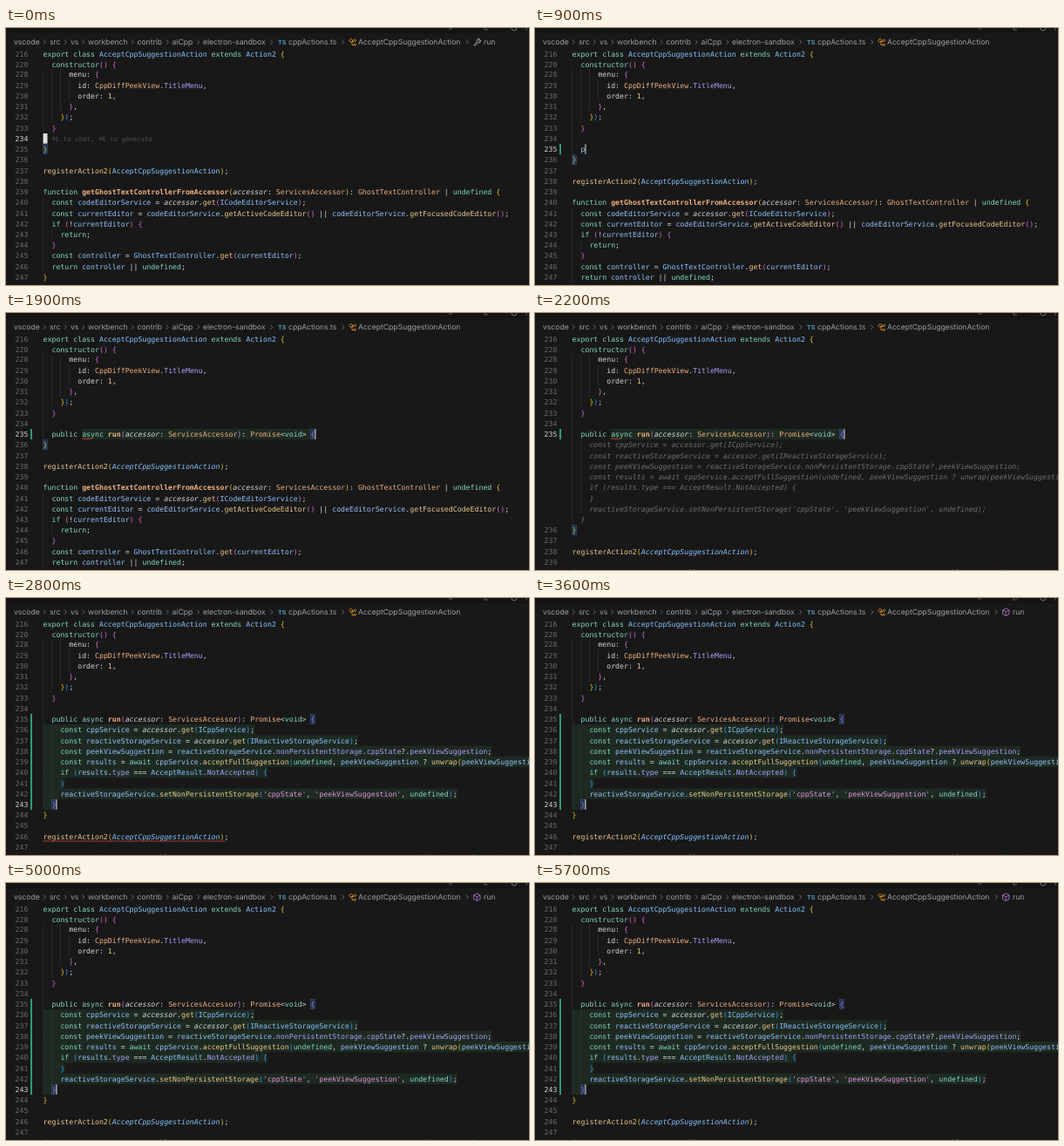
Recreate the animation shown at these times as an HTML page. Size 600 by 295 pixels, loop 5.8 s.

```html
<!DOCTYPE html>
<html lang="en">
<head>
<meta charset="utf-8">
<style>
  html, body { margin: 0; width: 100%; height: 100%; overflow: hidden; background: #181818; }
  svg { display: block; }
  text { white-space: pre; text-rendering: geometricPrecision; fill: #d6d6dd; }
  .code { font: 8.22px "DejaVu Sans Mono", monospace; }
  .crumb { font: 8.6px Inter, sans-serif; fill: #a0a0a0; }
  .ghost { font-style: italic; fill: #6f6f6f; }
  .num { fill: #6a6a6a; }
  .on { fill: #d0d0d0; }
  .hint { font-size: 7.4px; fill: #505050; }
  .detail { font-size: 7.06px; fill: #a3a7ad; }
</style>
</head>
<body>
<svg id="stage" width="600" height="295" viewBox="0 0 600 295"></svg>
<script>
const LOOP = 5800;
const LEFT = 42.6, CHAR = 4.949, ROW = 12.24;
const NEW_ROW = 9;

const HEAD = [
  'export class AcceptCppSuggestionAction extends Action2 {',
  '  constructor() {',
  '      menu: {',
  '        id: CppDiffPeekView.TitleMenu,',
  '        order: 1,',
  '      },',
  '    });',
  '  }',
  ''
];
const SIGNATURE = '  public async run(accessor: ServicesAccessor): Promise<void> {';
const BODY = [
  '    const cppService = accessor.get(ICppService);',
  '    const reactiveStorageService = accessor.get(IReactiveStorageService);',
  '    const peekViewSuggestion = reactiveStorageService.nonPersistentStorage.cppState?.peekViewSuggestion;',
  '    const results = await cppService.acceptFullSuggestion(undefined, peekViewSuggestion ? unwrap(peekViewSuggestion) : undefined);',
  '    if (results.type === AcceptResult.NotAccepted) {',
  '    }',
  "    reactiveStorageService.setNonPersistentStorage('cppState', 'peekViewSuggestion', undefined);",
  '  }'
];
const TAIL = [
  '}',
  '',
  'registerAction2(AcceptCppSuggestionAction);',
  '',
  'function getGhostTextControllerFromAccessor(accessor: ServicesAccessor): GhostTextController | undefined {',
  '  const codeEditorService = accessor.get(ICodeEditorService);',
  '  const currentEditor = codeEditorService.getActiveCodeEditor() || codeEditorService.getFocusedCodeEditor();',
  '  if (!currentEditor) {',
  '    return;',
  '  }',
  '  const controller = GhostTextController.get(currentEditor);',
  '  return controller || undefined;',
  '}'
];

const KEYWORDS = new Set(('export class extends constructor function const if return ' +
  'undefined public async await void').split(' '));
const BRACKETS = ['#e8c52c', '#d070cc', '#2f9bf0'];
const COLOR = {
  keyword: '#83d6c5', plain: '#d6d6dd', type: '#efb080', klass: '#87c3ff',
  call: '#ebc88d', prop: '#aaa0fa', string: '#e394dc', variable: '#94c1fa'
};

const colX = col => LEFT + col * CHAR;
const rowY = row => 28.9 + row * ROW + (row < 2 ? 1 : 0);
const escape = s => s.replace(/&/g, '&amp;').replace(/</g, '&lt;');
const rect = (x, y, w, h, fill, more = '') =>
  `<rect x="${x}" y="${y}" width="${w}" height="${h}" fill="${fill}" ${more}/>`;
const text = (x, y, cls, content, more = '') =>
  `<text x="${x}" y="${y}" class="${cls}" ${more}>${content}</text>`;
const path = (d, stroke, width = 0.8) =>
  `<path d="${d}" fill="none" stroke="${stroke}" stroke-width="${width}"/>`;

// Colours one line; depth selects the bracket colour and carries over to the next line.
function highlight(line, depth, italicClass) {
  const tokens = /'[^']*'|\w+|[{}()]|[^\w{}()']+/g;
  let out = '';
  for (const m of line.matchAll(tokens)) {
    const word = m[0], before = line.slice(0, m.index), after = line[m.index + word.length];
    let fill = COLOR.plain, style = '';
    if ('({'.includes(word)) fill = BRACKETS[depth++ % 3];
    else if (')}'.includes(word)) fill = BRACKETS[--depth % 3];
    else if (word[0] === "'") fill = COLOR.string;
    else if (KEYWORDS.has(word)) fill = COLOR.keyword;
    else if (/^\d/.test(word)) fill = COLOR.call;
    else if (word === 'accessor') style = 'font-style="italic"';
    else if (/^\w/.test(word)) {
      if (/(function|async) $/.test(before)) { fill = COLOR.type; style = 'font-weight="bold"'; }
      else if (after === '(') fill = COLOR.call;
      else if (before.endsWith('.')) fill = COLOR.prop;
      else if (/^[A-Z]/.test(word)) {
        fill = before.endsWith(': ') ? COLOR.type : COLOR.klass;
        if (italicClass && before.endsWith('registerAction2(')) style = 'font-style="italic"';
      }
      else if (after !== ':') fill = COLOR.variable;
    }
    out += `<tspan fill="${fill}" ${style}>${escape(word)}</tspan>`;
  }
  return { out, depth };
}

function squiggle(x, end, y) {
  let d = `M${x} ${y}`;
  for (let up = true; x < end; up = !up) d += `L${x += 1.4} ${y + (up ? -1.3 : 0)}`;
  return path(d, '#e0504a', 0.8);
}

function breadcrumbs(showRun, wrench) {
  const items = [['vscode', 9], ['src', 50], ['vs', 74], ['workbench', 94], ['contrib', 150.5],
    ['aiCpp', 190.5], ['electron-sandbox', 226], ['cppActions.ts', 324], ['AcceptCppSuggestionAction', 404]];
  if (showRun) items.push(['run', 548]);
  let out = items.map(([label, x]) => text(x, 19.3, 'crumb', label)).join('');
  const gaps = [44, 68, 88.5, 145, 185, 220.5, 304.5, 386.5];
  if (showRun) gaps.push(529);
  out += gaps.map(x => path(`M${x - 1} 13.7l2.3 2.5l-2.3 2.5`, '#7c7c7c', 0.8)).join('');
  out += text(312, 18.8, 'crumb', 'TS', 'style="fill:#519aba;font-size:7px;font-weight:700"');
  out += path('M393.5 14.5l2.5-2.3l2 2l-2.5 2.3zM396 15.5h3M397 15.5v4h2M399 14l1.5-1l1.3 1.3l-1.5 1.4zM399 19l1.5-1l1.3 1.3l-1.5 1.4z', '#ee9d28');
  if (!showRun) return out;
  return out + (wrench
    ? path('M537 19.5l3.4-3.8a2.4 2.4 0 0 1 3-3.2l-1.4 1.7l1.2 1.2l1.6-1.3a2.4 2.4 0 0 1-3.2 2.7l-3.4 3.7z', '#c5c5c5')
    : path('M536.5 14l4-2l3.5 2v4.3l-3.7 2.2l-3.8-2.2zM536.5 14l3.8 2l3.7-2M540.3 16v4.5', '#b180d7'));
}

const topStrip = () => rect(0, 0, 600, 6, '#141414') +
  path('M508 1h4M549 0v2h4M597 0v3', '#707070') + path('M580 0a3 3 0 0 0 6 0', '#8a8a8a');

function popup() {
  const x = 77.5, y = 145.5;
  return rect(x, y, 294.5, 25, '#1f1f1f', 'stroke="#3c3c3c" stroke-width=".7"') +
    rect(x + 0.5, y + 0.5, 293.5, 12.2, '#062f55') +
    path('M81 149.5h4M86.5 149.5h3M81 152.3h2M84.5 152.3h5M81 155h5M87.5 155h2', '#d0d0d0', 1) +
    path('M81.5 160.3h7.5v7.5h-7.5z', '#c5c5c5', 0.9) +
    text(93, 155, 'code', '<tspan font-weight="bold" fill="#73b8f0">publi</tspan>c') +
    text(93, 167.2, 'code', '<tspan font-weight="bold" fill="#73b8f0">publi</tspan>c method') +
    text(365.5, 154.8, 'code detail', 'public', 'text-anchor="end"') +
    text(365.5, 167, 'code detail', 'Public Method Definition', 'text-anchor="end"');
}

function stateAt(t) {
  const typed = [800, 1000, 1100, 1200, 1300].filter(at => t >= at).length;
  const blink = t < 2600 || Math.floor((t - 2600) / 500) % 2 === 0;
  return {
    opened: t >= 200,
    typed,
    inline: t >= 1300 && t < 1900,
    popup: t >= 1400 && t < 1900,
    signed: t >= 1900,
    preview: t >= 2100 && t < 2600,
    accepted: t >= 2600,
    error: t >= 2600 && t < 3300,
    run: t < 500 || t >= 3300,
    wrench: t < 500,
    blink
  };
}

function guides(s, tailRow) {
  const line = (col, from, to) =>
    rect(colX(col), rowY(from) - 6, 0.6, (to - from + 1) * ROW, '#353535');
  let out = line(0, 2, tailRow - 1) + line(2, 2, 6) + line(4, 2, 5) + line(6, 3, 4);
  out += line(0, tailRow + 5, tailRow + 11) + line(2, tailRow + 8, tailRow + 8);
  if (s.accepted || s.preview) out += line(2, 10, 16);
  return out;
}

function draw(s) {
  const lines = HEAD.map(code => ({ code }));
  if (s.opened) lines.push({ code: s.signed ? SIGNATURE : '  ' + 'public'.slice(0, s.typed) });
  if (s.preview) lines.push(...BODY.map(code => ({ code, ghost: true })));
  if (s.accepted) lines.push(...BODY.map(code => ({ code, fresh: true })));
  const tailRow = lines.length;
  lines.push(...TAIL.map(code => ({ code })));

  const active = !s.opened ? 8 : s.accepted ? 17 : NEW_ROW;
  const cursorCol = !s.opened ? 0 : s.accepted ? 3 : s.signed ? SIGNATURE.length : 2 + s.typed;
  const bracket = (col, row) =>
    rect(colX(col), rowY(row) - 5.5, CHAR, 11, '#183357', 'stroke="#526580" stroke-width=".4"');

  let back = '', front = '', depth = 0, number = 228;
  lines.forEach(({ code, ghost, fresh }, row) => {
    if (row > 22) return;
    const y = rowY(row);
    if (fresh) back += rect(LEFT, y - 6.1, code.length * CHAR, ROW, '#1e2a21');
    if (ghost) {
      front += text(LEFT, y + 3, 'code ghost', escape(code));
      return;
    }
    const label = row === 0 ? 216 : row === 1 ? 220 : number++;
    front += text(10.6, y + 3, 'code num' + (row === active ? ' on' : ''), label);
    if (row === 2) depth = 4;
    if (row === tailRow) depth = 1;
    const painted = highlight(code, depth, s.signed);
    depth = painted.depth;
    front += text(LEFT, y + 3, 'code', painted.out);
  });

  back += guides(s, tailRow);
  if (s.signed && !s.accepted)
    back += rect(colX(9), rowY(NEW_ROW) - 6.1, (SIGNATURE.length - 9) * CHAR, ROW, '#1e2a21');
  if (s.signed) back += bracket(SIGNATURE.length - 1, NEW_ROW);
  back += s.accepted ? bracket(2, 17) : bracket(0, tailRow);

  if (s.opened) front += rect(28, rowY(NEW_ROW) - 6.1, 2, ROW * (s.accepted ? 9 : 1), '#2a9d72');
  else front += text(colX(2), rowY(8) + 3, 'code hint', '⌘L to chat, ⌘K to generate');
  if (s.inline)
    front += text(colX(cursorCol), rowY(NEW_ROW) + 3, 'code ghost', escape(SIGNATURE.slice(cursorCol)));
  if (s.signed && !s.accepted) front += squiggle(colX(9), colX(11), rowY(NEW_ROW) + 6);
  if (s.error) front += squiggle(LEFT, colX(42), rowY(tailRow + 2) + 6);
  if (s.popup) front += popup();
  if (s.blink)
    front += rect(colX(cursorCol), rowY(active) - 5.8, s.opened ? 1 : CHAR, 11.6, '#e0e0e0');

  return rect(0, 0, 600, 295, '#181818') + topStrip() + breadcrumbs(s.run, s.wrench) + back + front;
}

const stage = document.getElementById('stage');
let shown = '';
function update(t) {
  const state = stateAt(t);
  const key = JSON.stringify(state);
  if (key === shown) return;
  shown = key;
  stage.innerHTML = draw(state);
}

const start = performance.now();
function tick() {
  update((performance.now() - start) % LOOP);
  requestAnimationFrame(tick);
}
tick();
</script>
</body>
</html>
```
